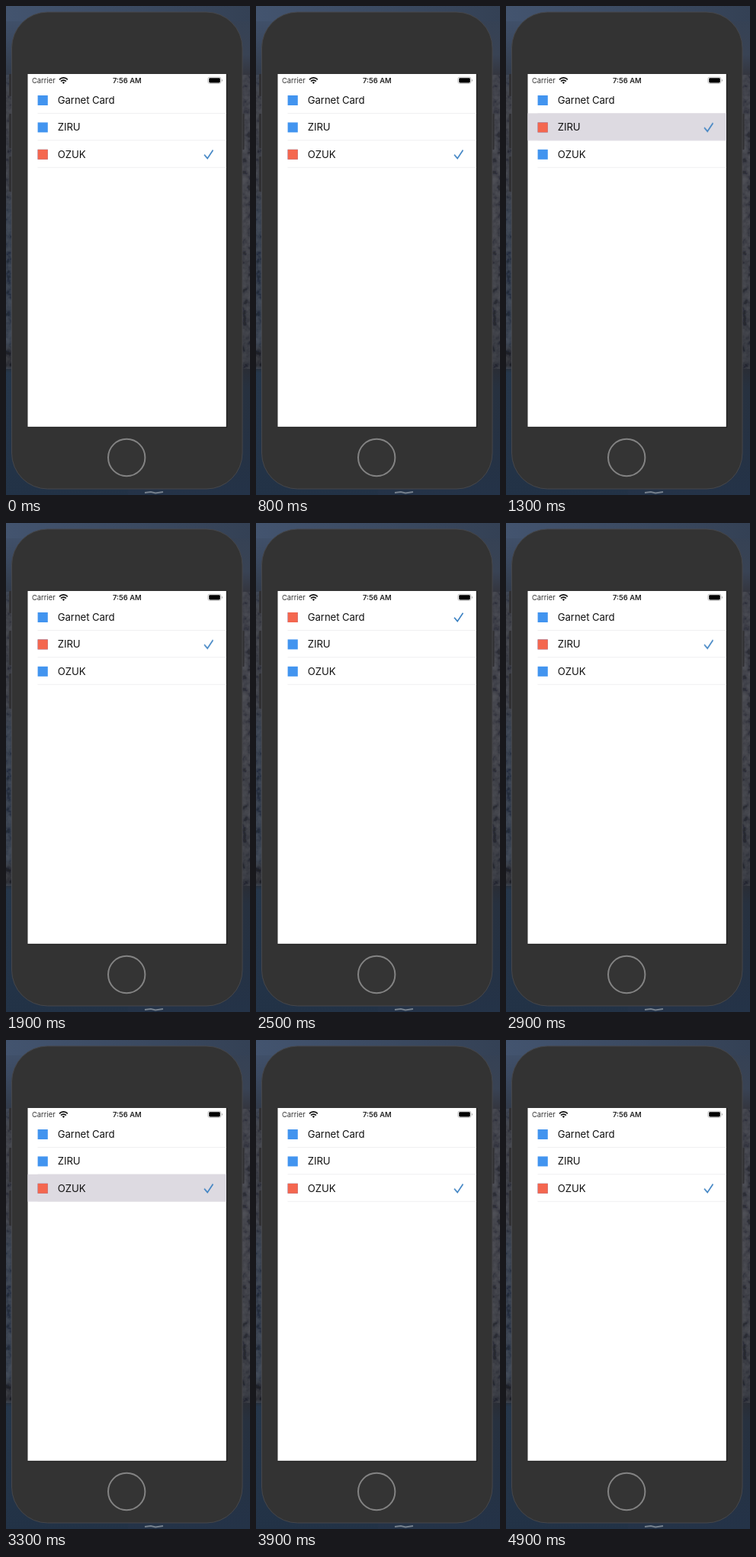
Animation, 320 px wide and 640 px high, one loop 5 s. Source, as an HTML page:

```html
<!DOCTYPE html>
<html lang="en">
<head>
<meta charset="utf-8">
<title>Card picker</title>
<style>
html, body { margin: 0; width: 100%; height: 100%; overflow: hidden; background: #2b3647; }
svg { display: block; width: 320px; height: 640px; }
text { font-family: Inter, Roboto, "Liberation Sans", sans-serif; fill: #111; }
.label { font-size: 13.2px; letter-spacing: -.1px; }
.status { font-size: 9.4px; fill: #333; }
.clock { font-weight: 600; fill: #222; }

/* Selected row: red square and check jump together. */
.pick { animation: pick 5s step-end infinite; }
.tap { fill: #dddae1; opacity: 0; animation: tap 5s step-end infinite; }

@keyframes pick {
  0%, 65.8% { transform: translateY(70.8px); }
  25.8%, 51.8% { transform: translateY(35.4px); }
  39.8% { transform: translateY(0); }
  100% { transform: translateY(70.8px); }
}
@keyframes tap {
  0%, 27.8%, 41.8%, 53.8%, 67.8%, 100% { opacity: 0; }
  25.8%, 39.8%, 51.8%, 65.8% { opacity: 1; }
}
</style>
</head>
<body>
<svg viewBox="0 0 320 640">
  <defs>
    <linearGradient id="left" x2="0" y2="1">
      <stop offset="0" stop-color="#43546f"/>
      <stop offset=".07" stop-color="#3c4a61"/>
      <stop offset=".14" stop-color="#323b4a"/>
      <stop offset=".18" stop-color="#33353c"/>
      <stop offset=".37" stop-color="#31343c"/>
      <stop offset=".42" stop-color="#2d3746"/>
      <stop offset=".69" stop-color="#2b3544"/>
      <stop offset=".71" stop-color="#25272d"/>
      <stop offset=".735" stop-color="#25272d"/>
      <stop offset=".75" stop-color="#26374b"/>
      <stop offset="1" stop-color="#223246"/>
    </linearGradient>
    <linearGradient id="right" x2="0" y2="1">
      <stop offset="0" stop-color="#344155"/>
      <stop offset=".1" stop-color="#394354"/>
      <stop offset=".14" stop-color="#34363f"/>
      <stop offset=".42" stop-color="#393a41"/>
      <stop offset=".6" stop-color="#33353c"/>
      <stop offset=".74" stop-color="#2a2d35"/>
      <stop offset=".78" stop-color="#27313f"/>
      <stop offset="1" stop-color="#243348"/>
    </linearGradient>
    <linearGradient id="sky">
      <stop offset="0" stop-color="#43546f"/>
      <stop offset="1" stop-color="#344155"/>
    </linearGradient>
    <filter id="rock" x="0" y="0" width="1" height="1">
      <feTurbulence type="fractalNoise" baseFrequency=".12" numOctaves="3" seed="4"/>
      <feColorMatrix values="1 0 0 0 -.3  1 0 0 0 -.3  1 0 0 0 -.27  0 0 0 0 1"/>
    </filter>
  </defs>

  <rect width="160" height="640" fill="url(#left)"/>
  <rect x="160" width="160" height="640" fill="url(#right)"/>
  <rect width="320" height="20" fill="url(#sky)"/>
  <g filter="url(#rock)" opacity=".16">
    <rect y="98" width="12" height="144"/>
    <rect y="449" width="12" height="24"/>
    <rect x="300" y="90" width="20" height="385"/>
  </g>
  <path d="M182 637l8-1 6 1.5 10-1.5" fill="none" stroke="#76818d" stroke-width="2"/>

  <g fill="#303033">
    <rect x="4" y="89" width="5" height="29" rx="1"/>
    <rect x="4" y="141" width="5" height="45" rx="1"/>
    <rect x="4" y="197" width="5" height="46" rx="1"/>
    <rect x="308" y="141" width="4.5" height="47" rx="1"/>
  </g>
  <rect x="7.5" y="8" width="302.5" height="624" rx="47" fill="#333" stroke="#46474b"/>
  <circle cx="158.2" cy="591" r="24.2" fill="#343434" stroke="#838383" stroke-width="2"/>
  <path d="M289.4 89V551.3H28.5" fill="none" stroke="#1c1c1c" stroke-width="1.3"/>
  <rect x="28.5" y="89" width="260.3" height="461.7" fill="#fff"/>

  <text class="status" x="34" y="101">Carrier</text>
  <g fill="none" stroke="#111" stroke-width="1.7">
    <path d="M70 96.3a7.4 7.4 0 0 1 10.8 0M72 98.6a4.7 4.7 0 0 1 6.8 0"/>
    <path d="M73.7 100l1.7 2 1.7-2a2.4 2.4 0 0 0-3.4 0z" fill="#111" stroke="none"/>
  </g>
  <text class="status clock" x="158.8" y="101" text-anchor="middle">7:56 AM</text>
  <rect x="264.8" y="93.2" width="17.2" height="8.2" rx="2.3" fill="#fff" stroke="#b5b5b5" stroke-width=".8"/>
  <rect x="266.2" y="94.2" width="14.6" height="6.2" rx="1.4"/>
  <path d="M283 96v2.8q1.1-.5 1.1-1.4T283 96z" fill="#aaa"/>

  <path d="M41.5 140.5H288.8M41.5 175.8H288.8M41.5 211.3H288.8" stroke="#efeff0" stroke-width=".9"/>

  <g class="pick"><rect class="tap" x="28.5" y="105" width="260.3" height="35.7"/></g>

  <g fill="#4294ef">
    <rect x="41.6" y="117" width="13.2" height="13"/>
    <rect x="41.6" y="152.4" width="13.2" height="13"/>
    <rect x="41.6" y="187.8" width="13.2" height="13"/>
  </g>
  <g class="pick">
    <rect x="41.6" y="117" width="13.2" height="13" fill="#f4674f"/>
    <path d="M260 123.8l4.2 4.8 7.3-10.8" fill="none" stroke="#3a80c2" stroke-width="1.6"/>
  </g>

  <g class="label">
    <text x="67.8" y="128">Garnet Card</text>
    <text x="67.8" y="163.4">ZIRU</text>
    <text x="67.8" y="198.8">OZUK</text>
  </g>
</svg>
</body>
</html>
```
